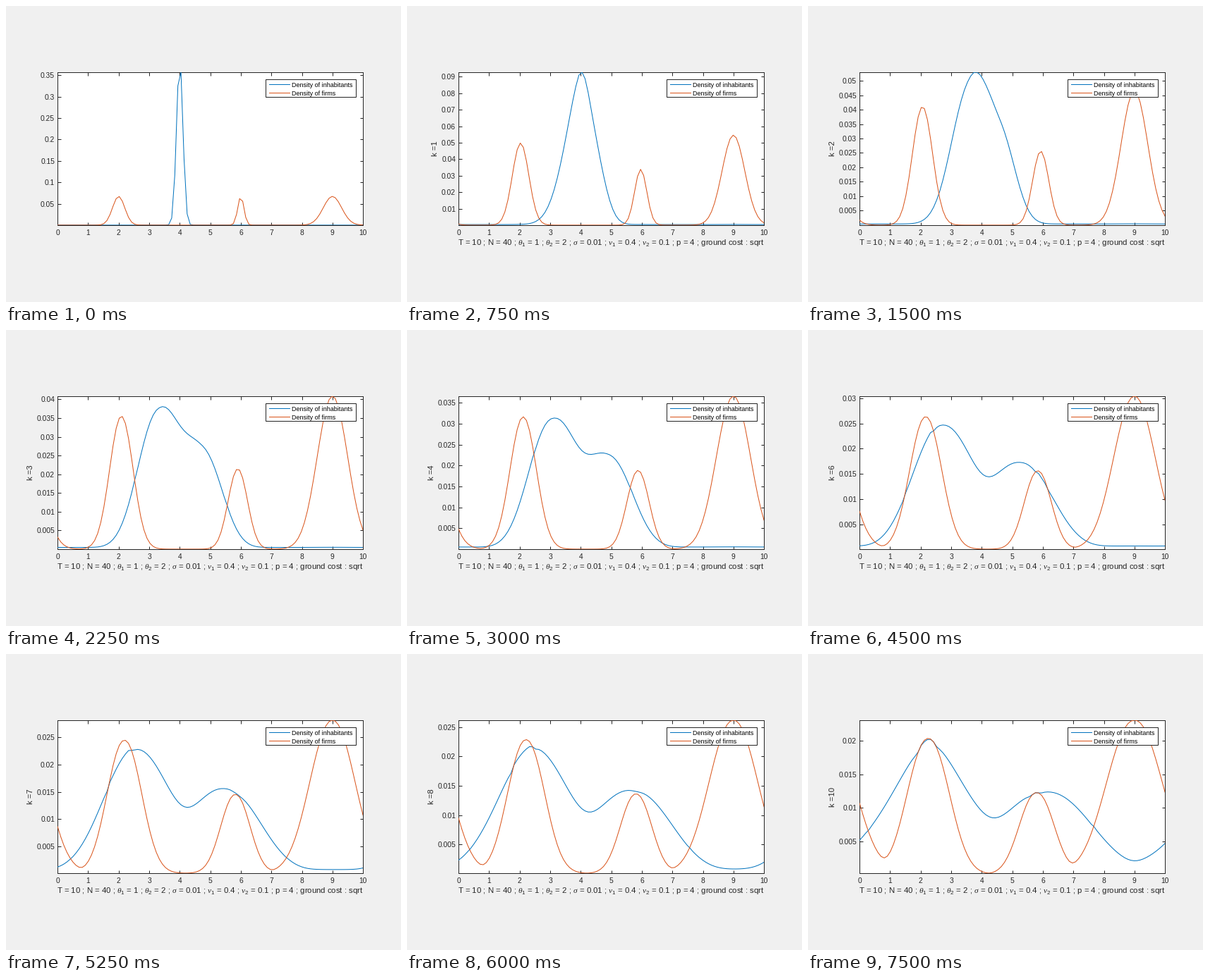
Recreate the animation shown at these times as a matplotlib script. Size 560x420 px, loop 8 s.

```python
import numpy as np
import matplotlib.pyplot as plt
from matplotlib.animation import FuncAnimation
from matplotlib.patches import Rectangle

W, H, DPI = 560, 420, 100
PX = 72 / DPI                      # one pixel in points
LEFT, RIGHT, TOP, BOTTOM = 73.1, 506.1, 93.9, 310.9
BLUE, ORANGE, INK = "#0072bd", "#d95319", "#262626"

plt.rcParams.update({
    "font.family": "Liberation Sans",
    "mathtext.fontset": "custom",
    "mathtext.rm": "Liberation Sans",
    "mathtext.it": "Liberation Serif:italic",
})

x = np.linspace(0, 10, 100)
DX = x[1]
PERIOD = 10 + DX


def hill(center, left, right, power):
    """Periodic bell of height 1 with separate half-widths."""
    d = (x - center + PERIOD / 2) % PERIOD - PERIOD / 2
    return np.exp(-np.abs(d / np.where(d < 0, left, right)) ** power)


def blend(parts, q):
    return sum(p ** q for p in parts) ** (1 / q)


def firms(k):
    def spread(mass, center, var):
        w = np.sqrt(var)
        return mass * DX / (np.sqrt(np.pi) * w) * hill(center, w, w, 2 + .015 * k)

    return 1e-5 * k + blend([
        spread(1 / 3, 2 + .032 * k - .0007 * k ** 2, .08 + .064 * k + .0016 * k ** 2),
        spread(1 / 6, 6 - .038 * k + .0018 * k ** 2, .02 + .0588 * k),
        spread(1 / 2, 9, .18 + .088 * k + .0048 * k ** 2)], 2)


def inhabitants(k, red):
    if k == 0:
        return DX / (np.sqrt(np.pi) * .148) * hill(4, .148, .148, 2)

    def through(a, b, c):
        """Parabola in k with these values at k = 2, 6, 10."""
        t = (k - 6) / 4
        return b + t * (c - a) / 2 + t * t * ((a + c) / 2 - b)

    west = hill(through(3.62, 2.72, 2.3), through(.85, 1.34, 1.9),
                through(.72, 1.5, 1.95), through(2.1, 2.15, 1.6))
    width = through(.77, 1.45, 2.05)
    east = hill(through(4.5, 5.25, 6.1), width, width, 2.2)
    floor = 3e-4 + 6e-5 * k
    blue = blend([west / through(21.4, 40.5, 50),
                  east / through(30.3, 58.1, 80.6), floor], .94 + .156 * k)
    # the two densities cling together where they meet
    gap = blue - red
    return red + gap ** 3 / (gap ** 2 + (.03 * red) ** 2)


fig = plt.figure(figsize=(W / DPI, H / DPI), dpi=DPI, facecolor="#f0f0f0")
ax = fig.add_axes([LEFT / W, 1 - BOTTOM / H,
                   (RIGHT - LEFT) / W, (BOTTOM - TOP) / H])
ax.set_xlim(0, 10)
ax.set_xticks(range(11))
ax.tick_params(direction="in", top=True, right=True, length=4.5 * PX,
               width=PX, color=INK, labelcolor=INK, labelsize=10.2 * PX)
ax.tick_params(axis="x", pad=6.5 * PX)
ax.tick_params(axis="y", pad=4 * PX)
for side in ax.spines.values():
    side.set(linewidth=PX, color=INK)

blue_line, = ax.plot([], [], color=BLUE, lw=PX, zorder=2.6)
red_line, = ax.plot([], [], color=ORANGE, lw=PX, zorder=2.7)


def put(px, py, s, size, color=INK, **kw):
    return fig.text(px / W, 1 - py / H, s, fontsize=size * PX,
                    color=color, **kw)


def overlay(artist):
    artist.set(transform=fig.transFigure, zorder=5)
    fig.add_artist(artist)


# legend
overlay(Rectangle((367.9 / W, 1 - 128.9 / H), 128 / W, 25 / H,
                  fc="white", ec=INK, lw=PX))
for base, color, name in [(115, BLUE, "inhabitants"), (127, ORANGE, "firms")]:
    overlay(plt.Line2D([372.5 / W, 402 / W], [1 - (base - 3.9) / H] * 2,
                       lw=PX, color=color))
    put(405, base, "Density of " + name, 9, "black", zorder=6)

ylabel = put(34.5, 202.5, "", 11.3, rotation=90, ha="center", va="center")
# the blank superscript lowers the subscript
xlabel = put(289.7, 340, r"T = 10 ; N = 40 ; $\theta^{\,}_1$ = 1 ; "
             r"$\theta^{\,}_2$ = 2 ; $\sigma$ = 0.01 ; $\nu^{\,}_1$ = 0.4 ; "
             r"$\nu^{\,}_2$ = 0.1 ; p = 4 ; ground cost : sqrt",
             11.4, ha="center", va="baseline")


def draw(i):
    k = min(i // 3, 10)
    red = firms(k)
    blue = inhabitants(k, red)
    blue_line.set_data(x, blue)
    red_line.set_data(x, red)

    low, high = min(blue.min(), red.min()), max(blue.max(), red.max())
    step = next(s for s in (.005, .01, .05) if high / s < 11)
    ticks = step * np.arange(1, int(high / step) + 1)
    ax.set_yticks(ticks, [f"{t:g}" for t in ticks])
    ax.set_ylim(low, high)

    ylabel.set_text(f"k ={k}" if k else "")
    ylabel.set_x((34.5 if step < .01 else 40) / W)
    xlabel.set_visible(k > 0)
    return blue_line, red_line


anim = FuncAnimation(fig, draw, frames=32, interval=250, repeat=True,
                     repeat_delay=0, init_func=lambda: draw(0))
plt.show()
```
